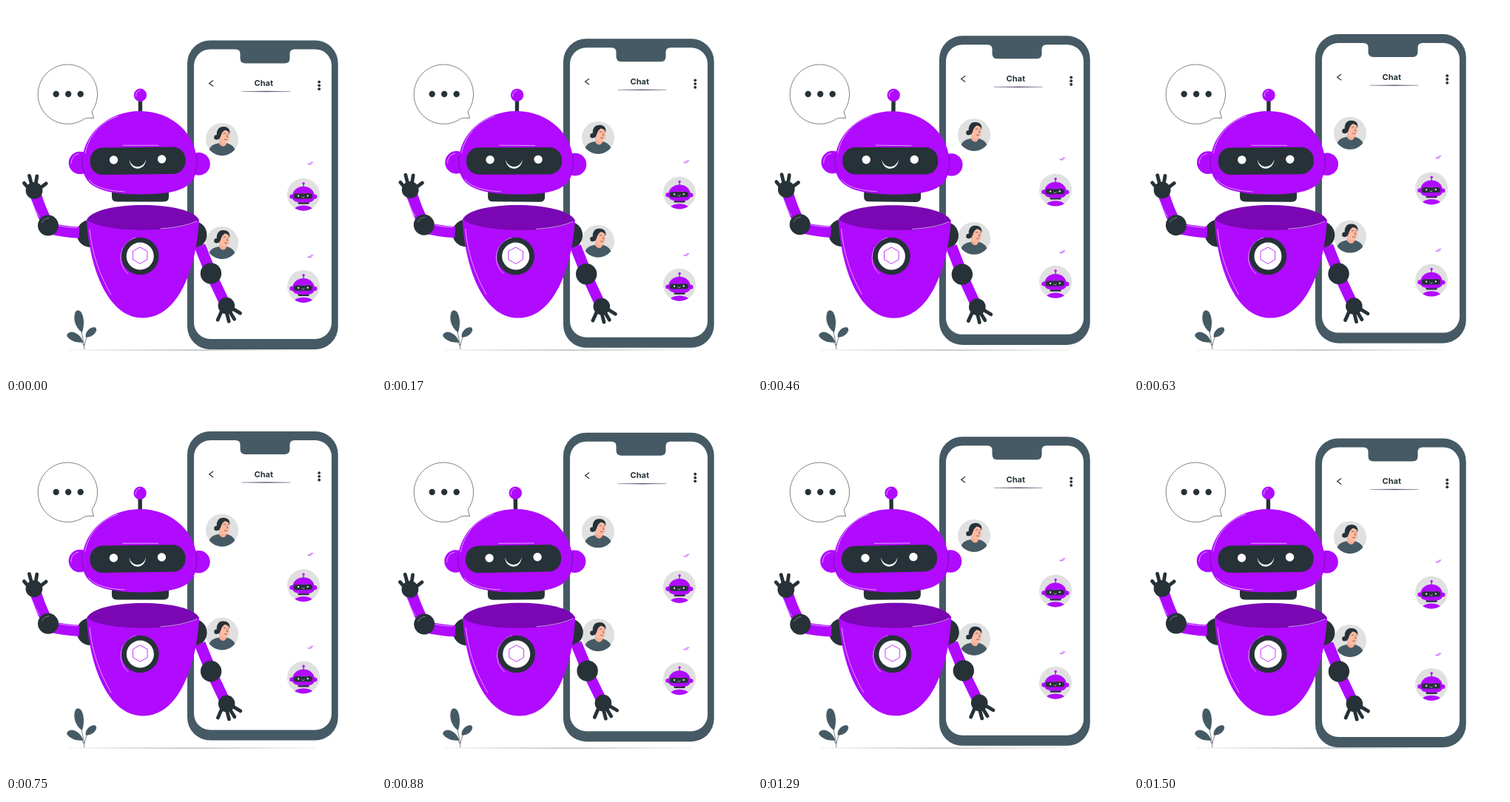
Recreate the animation shown at these times as an HTML page. Size 500 px wide and 500 px high, loop 1.54 s.

```html
<!DOCTYPE html>
<html lang="en">
<head>
<meta charset="utf-8">
<title>Chat bot</title>
<style>
  html, body { margin: 0; width: 100%; height: 100%; overflow: hidden; background: #fff; }
  svg { display: block; width: 100%; height: 100%; }
  .p { fill: #b00aff; }
  .d { fill: #263238; }
  .s { fill: #455a64; }
  .w { fill: #fff; }
  .line { fill: none; stroke: #263238; stroke-width: .6; }
  .limb { fill: none; stroke: #b00aff; stroke-width: 15.3; }
  .finger { fill: none; stroke: #263238; stroke-width: 4.8; stroke-linecap: round; }
  .shine { fill: none; stroke: #f3d6ff; stroke-width: .7; stroke-linecap: round; }
  .shade { fill: none; stroke: #5d0a8a; stroke-width: .6; }
  .tick { fill: none; stroke: #b00aff; stroke-width: .8; }
  .title { font: 700 11px Inter, "Open Sans", sans-serif; fill: #263238; text-anchor: middle; }
</style>
</head>
<body>
<svg viewBox="0 0 500 500">
  <defs>
    <clipPath id="round"><circle r="22"/></clipPath>

    <g id="head">
      <path class="d" d="M143 248H220V258Q220 264.5 213 264.5H150Q143 264.5 143 258Z"/>
      <rect class="d" x="178.6" y="126" width="5.4" height="20"/>
      <circle class="p" cx="181.3" cy="120.3" r="8.7"/>
      <path class="shine" d="M175.5 122A6.3 6.3 0 0 1 181 114.3"/>
      <circle class="p" cx="100" cy="212" r="15.3"/>
      <circle class="p" cx="260.5" cy="213.3" r="15.3"/>
      <path class="shine" d="M88 213C88 206 92 201 98 200"/>
      <path class="p" d="M181 142C225 142 258 174 258 212C258 246 235 254.5 181 254.5C127 254 103 244 103 212C103 174 137 142 181 142Z"/>
      <path class="shade" d="M103.6 202Q101.5 214 106 226M257 200Q260 213 255 227"/>
      <path class="shine" d="M107 199C111 176 128 156 151 149M112 235Q122 249 160 251M158 188.3H206"/>
      <rect class="d" x="113.5" y="191" width="129" height="36.5" rx="17" transform="rotate(-.7 178 209)"/>
      <circle class="w" cx="145.5" cy="208" r="5.7"/>
      <circle class="w" cx="210.5" cy="207" r="5.7"/>
      <path class="w" d="M166.5 207C167.5 224 188.5 224 189.3 206.5C186.5 220.5 169.5 220.5 166.5 207Z"/>
    </g>

    <g id="user">
      <circle r="22" fill="#e0e0e0"/>
      <g clip-path="url(#round)">
        <path class="s" d="M-18 15C-16 8 -10 6 -4 5H6C11 6 16 9 18 15V23H-18Z"/>
        <path fill="#f7ad93" d="M-4 -3H6V6Q2 13 -4 6Z"/>
        <ellipse fill="#ffbaa2" cx="2.8" cy="-4" rx="7.4" ry="9.5"/>
        <circle class="d" cx="-7.5" cy="-2.7" r="3.3"/>
        <path class="d" d="M-6.500 -2C-9 -11 -5 -17 1 -17C8 -17.500 11 -13 10.500 -7.500C9 -10.500 7 -12 3.500 -12.500C1 -11 -1 -8 -2 -4L-4 0Z"/>
        <path class="line" d="M2 -7.5L5 -8.200M7.500 -8L9.500 -7.500M6.500 -6L7.500 -3H6M3 0Q5 1.300 7 0"/>
      </g>
    </g>

    <g id="bot">
      <circle r="22" fill="#e0e0e0"/>
      <g clip-path="url(#round)">
        <ellipse class="p" cy="20.500" rx="12.500" ry="5.800"/>
        <use href="#head" transform="scale(.195) translate(-181 -198)"/>
      </g>
    </g>

    <path id="ticks" class="tick" d="M-3.500 .3L-2 2L2 -2M-.5 1.200L.3 2L4 -2"/>
  </defs>

  <path class="d" d="M65 465L252 464.650L440 465L252 465.350Z"/>

  <g id="plant">
    <path class="line" d="M106 464Q104.500 449 100.500 434M105.500 459Q102 452 92 446M106 459Q107 447 117 438"/>
    <path class="s" d="M103 441C93 435 90 421 94 413Q97 409.500 101 413C106 420 106 431 103 441Z"/>
    <path class="s" d="M104.500 454.500C94 455.500 85 451.500 82.200 445.500Q82.500 441 89 440.500C97 441.500 102 447.500 104.500 454.500Z"/>
    <path class="s" d="M107.500 447.500C107 440 113 434 120 434Q123.500 436 121.500 440C119 445 113 448 107.500 447.500Z"/>
  </g>

  <g id="bubble">
    <path class="line" d="M116.300 142.300A40.200 40.200 0 1 0 106.400 152.200Q112 150.500 118.600 151.600Q117 147 116.300 142.300Z"/>
    <circle class="d" cx="67.700" cy="119" r="4.200"/>
    <circle class="d" cx="84.200" cy="119" r="4.200"/>
    <circle class="d" cx="100.700" cy="119" r="4.200"/>
  </g>

  <g id="phone">
    <rect class="s" x="245" y="46" width="203.700" height="417.600" rx="31"/>
    <path class="w" d="M276 58H310Q316.500 58 316.500 64V70Q316.500 77 323.500 77H376.500Q383.500 77 383.500 70V64Q383.500 58 390 58H418A22 22 0 0 1 440 80V427.500A22 22 0 0 1 418 449.500H276A22 22 0 0 1 254 427.500V80A22 22 0 0 1 276 58Z"/>
    <path class="line" style="stroke-width:1.200" d="M280 100.100L274.600 104.100L280 108.100"/>
    <text class="title" x="348.300" y="107.800">Chat</text>
    <path fill="#4a3a5c" d="M318.800 115.100L352 114.600L384.300 115.100L352 115.600Z" stroke="#5f4a72" stroke-width=".3"/>
    <circle class="d" cx="423.200" cy="102.100" r="1.900"/>
    <circle class="d" cx="423.200" cy="106.900" r="1.900"/>
    <circle class="d" cx="423.200" cy="111.700" r="1.900"/>
    <use href="#user" x="292" y="179.700"/>
    <use href="#user" x="292" y="319.500"/>
    <use href="#bot" x="402" y="254.300"/>
    <use href="#bot" x="402" y="378.500"/>
    <use href="#ticks" x="411" y="212"/>
    <use href="#ticks" x="411" y="337.700"/>
  </g>

  <g id="robot">
    <circle class="d" cx="114" cy="307.500" r="18.500"/>
    <path class="limb" d="M57 300Q76 305 99 306.300"/>
    <path class="limb" d="M39.500 253Q45 272 54.500 291"/>
    <path class="shine" d="M69 296.500Q82 299.500 96 299.700M35 264Q39 276 45 285"/>
    <circle class="d" cx="57" cy="296.700" r="14"/>
    <path class="shine" style="stroke:#9aa5aa" d="M48.500 293Q51 287 58 286.500"/>
    <circle class="d" cx="38" cy="249.500" r="11.400"/>
    <path class="finger" d="M31 247L24.500 239.500M35 243L31.500 229.500M40 242L41.800 230M45 247L54.200 240"/>

    <circle class="d" cx="253" cy="309" r="18.500"/>
    <path class="limb" d="M262 324L277 361"/>
    <path class="limb" style="stroke-width:14.300" d="M278 364L296 402"/>
    <circle class="d" cx="277" cy="361.300" r="14.200"/>
    <circle class="d" cx="298" cy="405" r="11.300"/>
    <path class="finger" d="M292 411L286.300 424M298 413L301.300 426M302 412L308.700 423M305 408L316.700 415"/>

    <path fill="#7a07b3" d="M109 289C122 262.300 248 262.300 261 289C245 311 128 311 109 289Z"/>
    <path class="p" d="M109 288.500C112 349 136 421.500 185 421.500C235 421.500 258 350 261 288.500C243 307.500 129 307.500 109 288.500Z"/>
    <path class="shine" d="M209 301Q240 299 258 290.700M113 302C116 333 126 363 142 390"/>
    <path class="shine" d="M175 313A28.500 28.500 0 0 0 165 362"/>
    <circle class="d" cx="181.300" cy="338" r="25.300"/>
    <circle class="w" cx="181.300" cy="338" r="18.500"/>
    <path class="tick" d="M181.200 325.900L191 331.400V342.500L181.200 348.300L171.400 342.500V331.400Z"/>
    <use href="#head"/>
  </g>
</svg>
<script>
  const LOOP = 1540, STEP = 1000 / 24, CYCLE = 1500, LEAD = 20;
  const phone = document.getElementById("phone");
  const robot = document.getElementById("robot");

  // 24 pictures a second, shown on a 10 ms grid
  const snap = t => Math.floor((Math.floor(t / 10) * 10 + 5) / STEP) * STEP;

  // 0 at the ends of the cycle, 1 in the middle
  const rise = p => 1 - Math.abs(1 - 2 * p);

  // 0, up to 1, down to -1, back to 0
  const swing = p => p < .25 ? 4 * p : p < .75 ? 2 - 4 * p : 4 * p - 4;

  function draw(ms) {
    const p = (snap(ms % LOOP) + LEAD) / CYCLE % 1;
    phone.setAttribute("transform", `translate(0 ${(.7 - 10 * rise(p)).toFixed(3)})`);
    robot.setAttribute("transform", `rotate(${swing(p).toFixed(4)} 171 270)`);
  }

  const start = performance.now();
  function tick() {
    draw(performance.now() - start);
    requestAnimationFrame(tick);
  }
  draw(0);
  requestAnimationFrame(tick);
</script>
</body>
</html>
```
